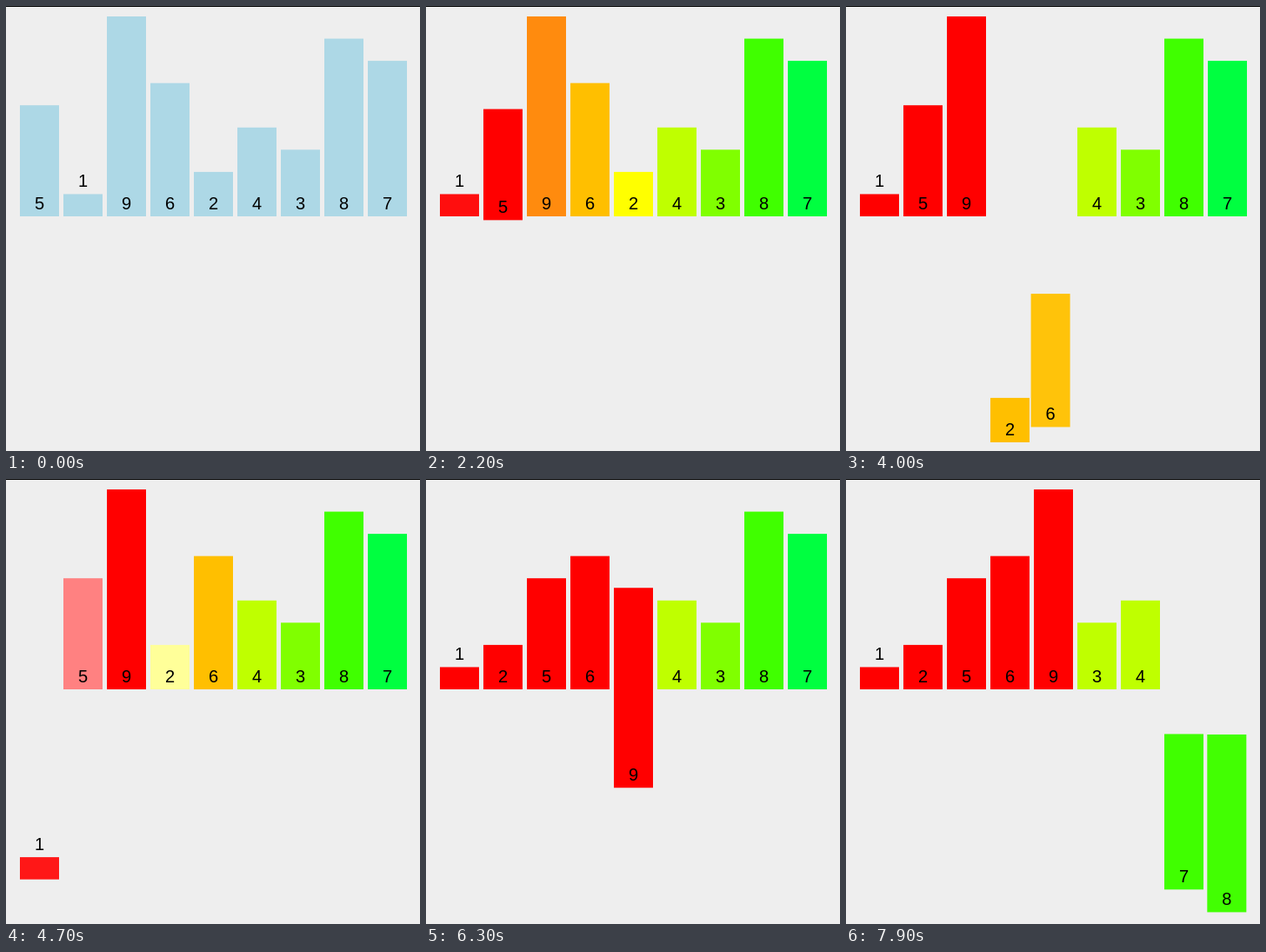
An HTML page that plays this animation: 476 px wide and 512 px high, repeating every 8000 ms.

```html
<!DOCTYPE html>
<html lang="en">
<head>
<meta charset="utf-8">
<title>Merge sort</title>
<style>
  html, body { margin: 0; width: 100%; height: 100%; overflow: hidden; background: #eee; }
  svg { display: block; width: 476px; height: 512px; }
  text { font: 20px "Liberation Sans", Arial, sans-serif; text-anchor: middle; }
</style>
</head>
<body>
<svg id="stage" viewBox="0 0 476 512"><rect width="476" height="1"/></svg>
<script>
const LOOP = 8000, FRAME = 100;
const COLOUR_START = 1150, FIRST_STEP = 1257, STEP = 183.75, DURATION = 250;
const TOP_BASE = 242, LOW_BASE = 502, UNIT = 230 / 9, WIDTH = 45, LIGHTEN = 153;
const values = [5, 1, 9, 6, 2, 4, 3, 8, 7];
const lightBlue = [173, 216, 230];
const rainbow = [
  [255, 0, 0], [255, 64, 0], [255, 128, 0], [255, 191, 0], [255, 255, 0],
  [191, 255, 0], [128, 255, 0], [64, 255, 0], [0, 255, 64]
];
const columnX = i => 16 + 50 * i;

// cubic-bezier(.25, .1, .25, 1)
function ease(x) {
  if (x >= 1) return 1;
  let lo = 0, hi = 1;
  for (let i = 0; i < 20; i++) {
    const u = (lo + hi) / 2;
    if (0.75 * u * (1 - u) + u ** 3 < x) lo = u; else hi = u;
  }
  return 0.3 * lo * (1 - lo) ** 2 + 3 * lo * lo * (1 - lo) + lo ** 3;
}

const stage = document.getElementById('stage');
function add(tag, attrs) {
  const node = document.createElementNS('http://www.w3.org/2000/svg', tag);
  for (const key in attrs) node.setAttribute(key, attrs[key]);
  return stage.appendChild(node);
}

// A pose is [x, base, red, green, blue].
const bars = values.map((value, i) => {
  const height = value * UNIT;
  const bar = {
    value, height, lit: false, tweens: [],
    rest: [columnX(i), TOP_BASE, ...lightBlue],
    rect: add('rect', { width: WIDTH, height }),
    label: add('text', {})
  };
  bar.label.textContent = value;
  bar.goal = bar.rest;
  return bar;
});

function poseAt(bar, time) {
  const tween = bar.tweens.findLast(t => t.start <= time);
  if (!tween) return bar.rest;
  const k = ease((time - tween.start) / DURATION);
  return tween.from.map((v, i) => v + (tween.to[i] - v) * k);
}

function tweenTo(bar, start, x, base, colour) {
  const from = poseAt(bar, start);
  bar.goal = [x, base, ...colour];
  bar.tweens.push({ start, from, to: bar.goal });
}

let step = 0;
const now = () => FIRST_STEP + step * STEP;

function highlight(bar) {
  if (!bar || bar.lit) return;
  const [x, base, ...colour] = bar.goal;
  bar.lit = true;
  tweenTo(bar, now(), x, base, colour.map(c => Math.min(255, c + LIGHTEN)));
}

function compare(left, right) {
  if (left.length && right.length) [left[0], right[0]].forEach(highlight);
}

function merge(order, lo, mid, hi) {
  const left = order.slice(lo, mid + 1), right = order.slice(mid + 1, hi + 1);
  const colour = rainbow[lo];
  compare(left, right);
  step++;
  for (let i = lo; i <= hi; i++) {
    const takeLeft = !right.length || (left.length && left[0].value < right[0].value);
    const bar = (takeLeft ? left : right).shift();
    order[i] = bar;
    bar.lit = false;
    tweenTo(bar, now(), columnX(i), LOW_BASE, colour);
    compare(left, right);
    step++;
  }
  for (let i = lo; i <= hi; i++) {
    tweenTo(order[i], now(), columnX(i), TOP_BASE, colour);
    step++;
  }
}

function mergeSort(order, lo, hi) {
  if (lo >= hi) return;
  const mid = (lo + hi) >> 1;
  mergeSort(order, lo, mid);
  mergeSort(order, mid + 1, hi);
  merge(order, lo, mid, hi);
}

bars.forEach((bar, i) => tweenTo(bar, COLOUR_START, columnX(i), TOP_BASE, rainbow[i]));
mergeSort([...bars], 0, bars.length - 1);

function draw() {
  const time = Math.floor(performance.now() % LOOP / FRAME) * FRAME;
  for (const bar of bars) {
    const [x, base, ...colour] = poseAt(bar, time);
    const top = base - bar.height;
    bar.rect.setAttribute('x', x);
    bar.rect.setAttribute('y', top);
    bar.rect.setAttribute('fill', `rgb(${colour.map(Math.round)})`);
    bar.label.setAttribute('x', x + WIDTH / 2);
    bar.label.setAttribute('y', (bar.value > 1 ? base : top) - 8);
  }
  requestAnimationFrame(draw);
}
draw();
</script>
</body>
</html>
```
